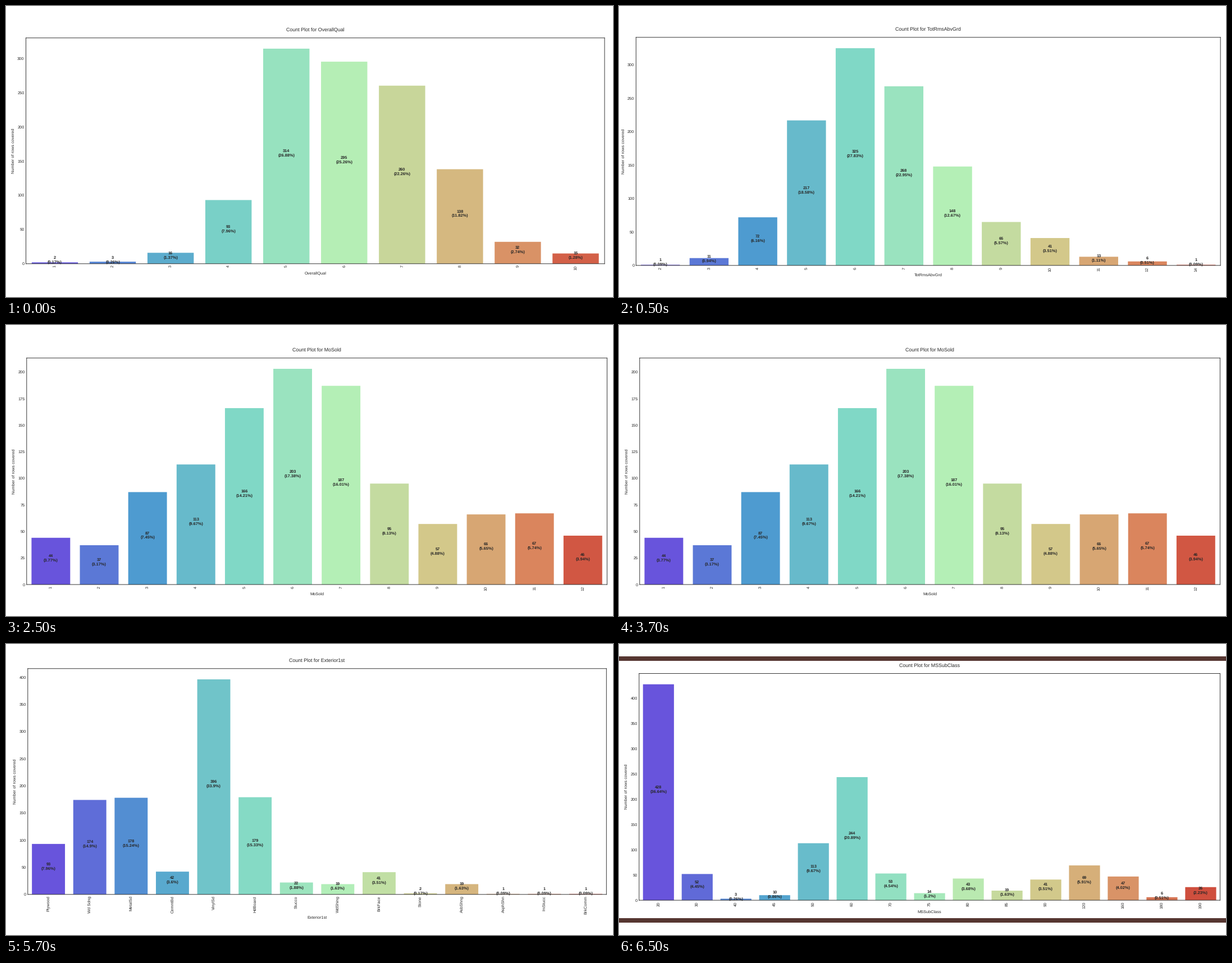
A matplotlib script that plays this animation: 1081x518 px, repeating every 8000 ms.

```python
import numpy as np
import matplotlib.pyplot as plt
from matplotlib.animation import FuncAnimation
from matplotlib.colors import LinearSegmentedColormap
from matplotlib.patches import Rectangle

W, H, DPI = 1081, 518, 64
PLOT_W, PLOT_H = 1030.5, 402  # plot box at zoom 1
U = 0.74 * 72 / DPI  # one chart point, drawn 0.74 px large
INK = "0.15"
STEP = 500

plt.rcParams.update({
    "font.family": "Liberation Sans",
    "font.size": 10 * U,
    "text.hinting": "none",
    "text.color": INK,
    "axes.labelcolor": INK,
    "axes.edgecolor": INK,
    "axes.linewidth": 1.25 * U,
    "axes.labelpad": 4 * U,
    "axes.titlepad": 16 * U,
    "xtick.color": INK,
    "ytick.color": INK,
    "xtick.major.size": 0,
    "ytick.major.size": 0,
    "xtick.major.pad": 3.5 * U,
    "ytick.major.pad": 4 * U,
    "toolbar": "None",
})

MUTED = LinearSegmentedColormap.from_list("muted", [
    "#6854dc", "#4e9cd0", "#80d8c6", "#b4efb7", "#d3c88a", "#da865e", "#c82a28"])

# name, (left, top, zoom), steps on screen, categories, counts
CHARTS = [
    ("OverallQual", (35.5, 56.8, 1), 1, range(1, 11),
     (2, 3, 16, 93, 314, 295, 260, 138, 32, 15)),
    ("TotRmsAbvGrd", (30.3, 55.8, 1.01), 4, (*range(2, 13), 14),
     (1, 11, 72, 217, 325, 268, 148, 65, 41, 13, 6, 1)),
    ("MoSold", (36.8, 58.8, 1.003), 4, range(1, 13),
     (44, 37, 87, 113, 166, 203, 187, 95, 57, 66, 67, 46)),
    ("Exterior1st", (38.8, 43.8, 1), 4,
     ("Plywood", "Wd Sdng", "MetalSd", "CemntBd", "VinylSd", "HdBoard",
      "Stucco", "WdShing", "BrkFace", "Stone", "AsbShng", "AsphShn",
      "ImStucc", "BrkComm"),
     (93, 174, 178, 42, 396, 179, 22, 19, 41, 2, 19, 1, 1, 1)),
    ("MSSubClass", (35.8, 52.5, 1.004), 3,
     (20, 30, 40, 45, 50, 60, 70, 75, 80, 85, 90, 120, 160, 180, 190),
     (428, 52, 3, 10, 113, 244, 53, 14, 43, 19, 41, 69, 47, 6, 26)),
]


def pixel_rect(x, y, w, h):
    """Figure fractions of a box given in pixels from the top left."""
    return x / W, 1 - (y + h) / H, w / W, h / H


def count_plot(fig, name, place, cats, counts):
    left, top, zoom = place
    n, total = len(counts), sum(counts)
    ax = fig.add_axes(pixel_rect(left, top, PLOT_W * zoom, PLOT_H * zoom))

    x = np.arange(n)
    colors = MUTED((13 * (x + 1) / (n + 1) - 1) / 12)
    ax.bar(x, counts, 0.8, color=colors, linewidth=0, snap=False)
    for i, count in enumerate(counts):
        share = round(100 * count / total, 2)
        ax.annotate(f"{count}\n({share}%)", (i, count / 2), (0, -2),
                    textcoords="offset points", ha="center", va="bottom",
                    weight="bold")

    ax.set(xlim=(-0.5, n - 0.5), ylim=(0, max(counts) * 1.05),
           title=f"Count Plot for {name}", xlabel=name)
    ax.set_ylabel("Number of rows covered", labelpad=5 * U)
    ax.set_xticks(x, cats, rotation=90)
    for spine in ax.spines.values():
        spine.set_snap(False)
    return ax


def band(ax, y, h):
    fx, fy, fw, fh = pixel_rect(0, y, W, h)
    ax.add_patch(Rectangle((fx, fy), fw, fh, fc="#563631", lw=0,
                           transform=ax.figure.transFigure, clip_on=False))


fig = plt.figure(figsize=(W / DPI, H / DPI), dpi=DPI, facecolor="white")
scenes = [count_plot(fig, name, place, cats, counts)
          for name, place, _, cats, counts in CHARTS]
for y in (22, 487.5):
    band(scenes[-1], y, 8)

order = np.repeat(np.arange(len(CHARTS)), [chart[2] for chart in CHARTS])


def update(step):
    for i, ax in enumerate(scenes):
        ax.set_visible(i == order[step])
    return scenes


anim = FuncAnimation(fig, update, frames=len(order), interval=STEP,
                     init_func=lambda: update(0), repeat=True, repeat_delay=0)
plt.show()
```
